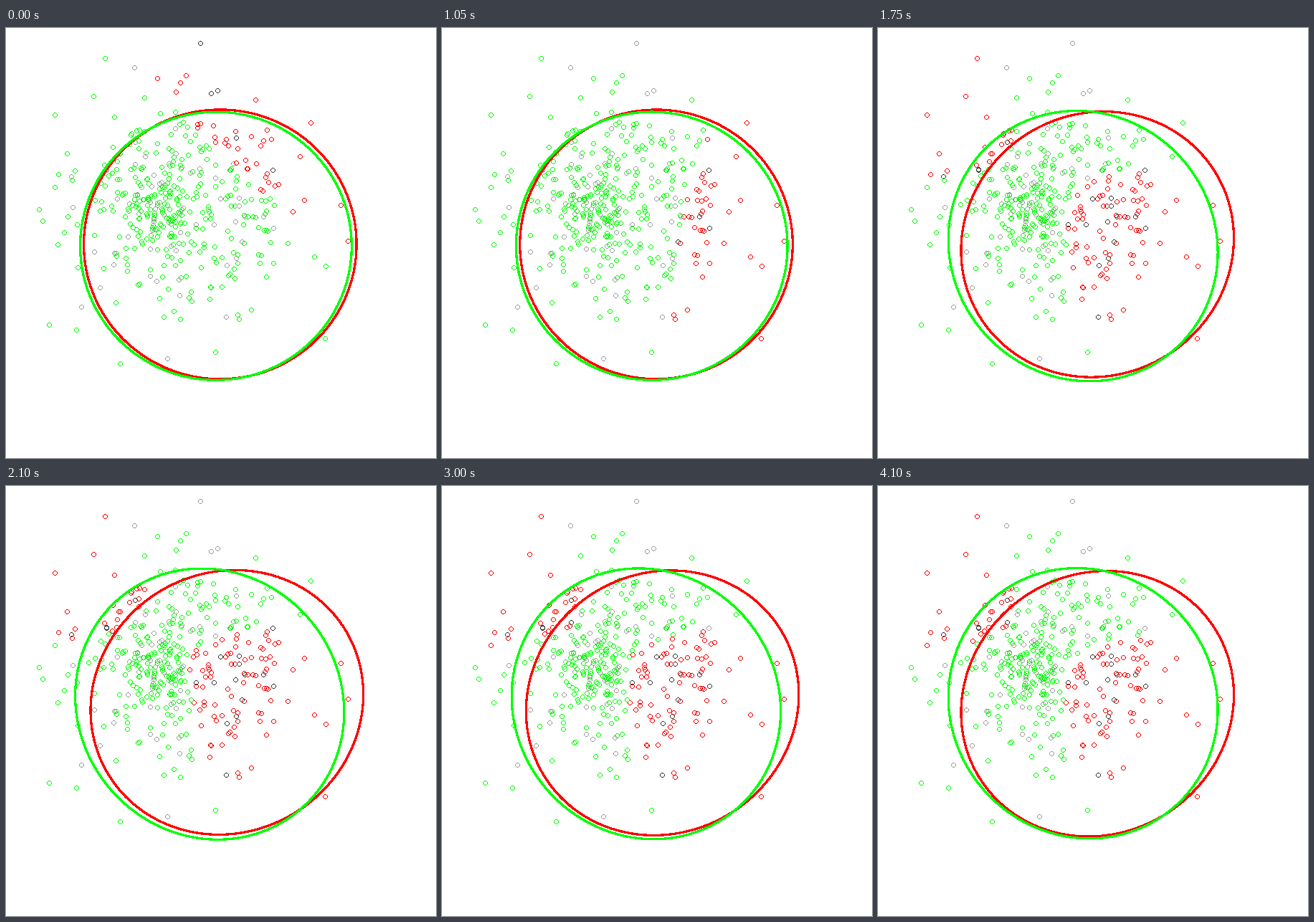
Recreate the animation shown at these times as a matplotlib script. Size 600 by 600 pixels, loop 4150 ms.

```python
import numpy as np
import matplotlib.pyplot as plt
from matplotlib.animation import FuncAnimation

SIZE, DPI = 600, 100
STEP, FRAMES = 50, 83
PX = 72 / DPI
RED, GREEN, DARK, GREY = np.array(
    [(255, 0, 0), (0, 255, 0), (64, 64, 64), (160, 160, 160)], np.uint8)

# Far points of the second and the first kind; the rest is scattered by rule.
FAR_SECOND = [(271, 21), (179, 55), (286, 91), (295, 87), (91, 207),
              (225, 461), (307, 403), (105, 389)]
FAR_FIRST = [(138, 42), (122, 95), (68, 121), (211, 70), (251, 66), (243, 76),
             (425, 132), (348, 100), (68, 222), (46, 253), (51, 269), (72, 302),
             (60, 414), (159, 468), (292, 452), (445, 433), (477, 297),
             (467, 247), (446, 332), (430, 319), (98, 421), (325, 406)]


def ease(t, start, end):
    u = np.clip((t - start) / (end - start), 0, 1)
    return u * u * (3 - 2 * u)


# Points: a dense blob, an even oval and a thin halo around it

def oval(rng, n, inner, outer, power):
    r = inner + (outer - inner) * rng.random(n) ** power
    a = rng.uniform(0, 2 * np.pi, n)
    return np.column_stack([247 + 132 * r * np.cos(a), 250 + 124 * r * np.sin(a)])


rng = np.random.default_rng(12)
field = np.vstack([rng.normal((208, 243), (32, 36), (115, 2)),
                   oval(rng, 240, 0, 1, .58), oval(rng, 46, 1, 1.4, 1.2)])
pts = np.rint(np.vstack([FAR_SECOND, FAR_FIRST, field])).astype(int)
second = np.arange(len(pts)) < len(FAR_SECOND)
second[-len(field):] = rng.random(len(field)) < .13
X, Y = pts.T

# One ring of pixels, three pixels from its middle
dy, dx = np.mgrid[-3:4, -3:4]
ring = np.rint(np.hypot(dx, dy)) == 3
rows, cols = Y[:, None] + dy[ring], X[:, None] + dx[ring]


def turn(t):
    """How far the two ellipses have swung apart."""
    return ease(t, .95, 2.1) - .22 * ease(t, 2.2, 4.2)


def cross(x0, y0, slant, tilt, gap):
    """Hyperbola: positive in two opposite corners around (x0, y0)."""
    u = X - x0 - slant * (Y - y0)
    v = Y - y0 + tilt * (X - x0)
    return (u * v - gap) / 200


def border(t):
    """Positive where a point belongs to the red ellipse."""
    spread = (1 - turn(t)) ** 2
    shapes = [.97 * X - 119 - Y,
              X - 384 + .0016 * (Y - 340) ** 2,
              cross(301, 60, 0, 0, 6500),
              cross(225, 201 + 7 * max(t - 1.45, 0), .27,
                    .12 + .22 * min(spread, .36), 900 + 6900 * min(spread, .36))]
    phase = np.interp(t, [0, .65, 1.05, 1.1, 1.45], [0, 1, 2, 2.6, 3])
    i = min(int(phase), 2)
    return shapes[i] + (shapes[i + 1] - shapes[i]) * (phase - i)


def outline(cx, cy, hx, hy, skew):
    a = np.linspace(0, 2 * np.pi, 361)
    return cx + .5 + hx * np.cos(a), cy + .5 - hy * np.sin(a + skew)


fig = plt.figure(figsize=(SIZE / DPI, SIZE / DPI), dpi=DPI, facecolor="white")
ax = fig.add_axes([0, 0, 1, 1])
ax.axis("off")
blank = np.full((SIZE, SIZE, 3), 255, np.uint8)
dots = ax.imshow(blank, extent=(0, SIZE, SIZE, 0), interpolation="nearest",
                 aspect="auto")
red, = ax.plot([], [], color="#ff0000", lw=2.2 * PX, antialiased=False)
green, = ax.plot([], [], color="#00ff00", lw=2.2 * PX, antialiased=False)
ax.set(xlim=(0, SIZE), ylim=(SIZE, 0))


def draw(i):
    t = i * STEP / 1000
    k = turn(t)
    in_red = border(t) > 0
    plain = np.where(in_red[:, None], RED, GREEN)
    dim = np.where(in_red[:, None], DARK, GREY)
    img = blank.copy()
    img[rows, cols] = np.where(second[:, None], dim, plain)[:, None]
    dots.set_data(img)
    late = ease(t, 2.2, 4.1)
    red.set_data(*outline(298.3 + 9.5 * k, 301.4 + 1.9 * late, 190.3,
                          188 - 3.5 * k, .06 * k + .02 * late))
    green.set_data(*outline(292.4 - 8.7 * k, 303.7 - late, 189.4 - 1.8 * k,
                            187.1 + 2 * k, -.06 * k))
    return dots, red, green


anim = FuncAnimation(fig, draw, frames=FRAMES, interval=STEP, repeat=True,
                     repeat_delay=0, blit=False)
plt.show()
```
